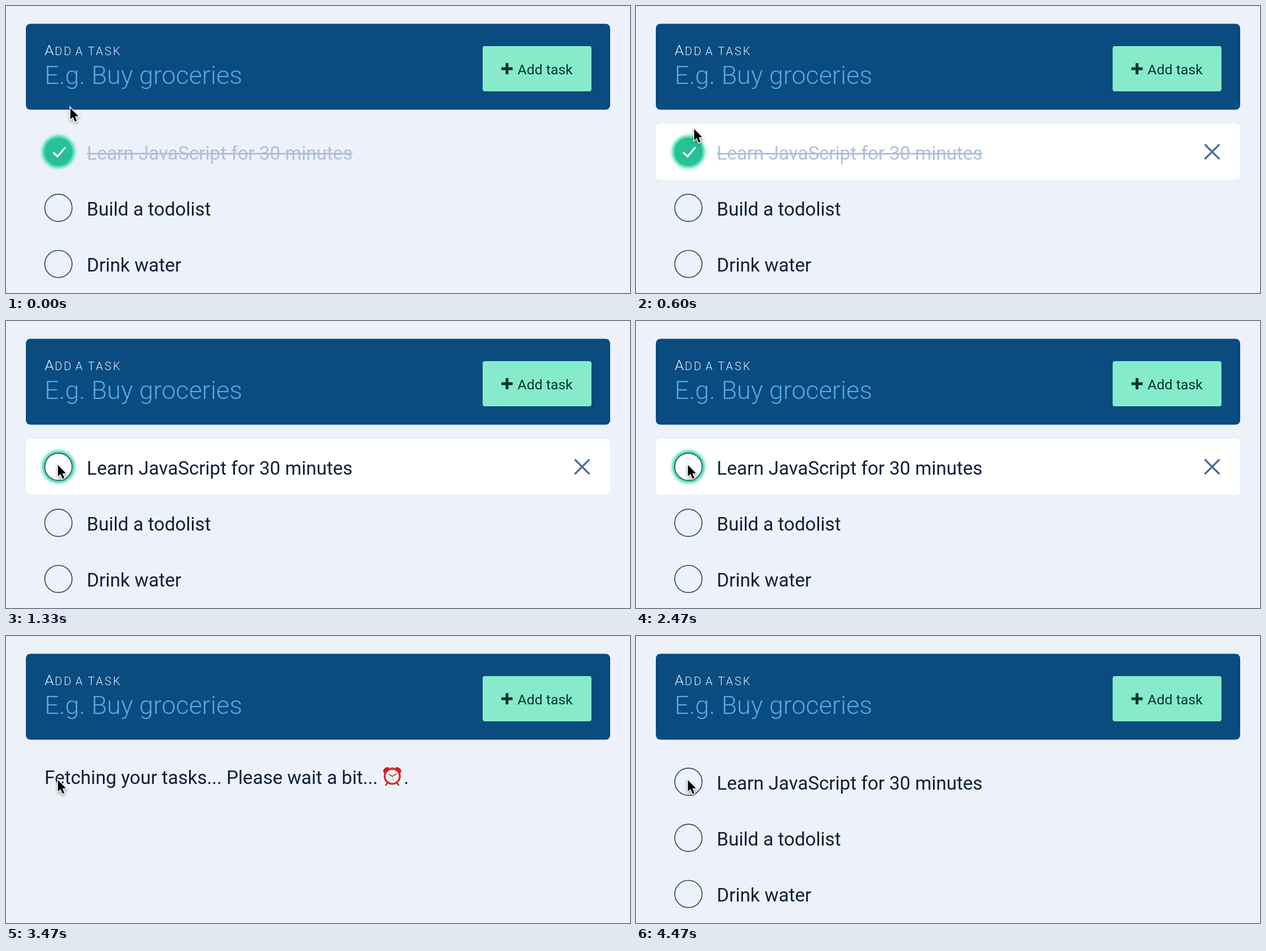
Recreate the animation shown at these times as an HTML page with a canvas. Size 1101 px wide and 508 px high, loop 4670 ms.

```html
<!DOCTYPE html>
<html lang="en">
<head>
<meta charset="utf-8">
<title>Todolist</title>
<style>
  html, body { margin: 0; width: 100%; height: 100%; overflow: hidden; background: #edf1f9; }
  canvas { display: block; width: 1101px; height: 508px; }
</style>
</head>
<body>
<canvas id="stage" width="1101" height="508"></canvas>
<script>
const ctx = document.getElementById('stage').getContext('2d');
const LOOP = 4670, TICK = 200 / 3;
const MOVE_START = 370, MOVE_END = 830, CLICK = 1000, RELOAD = 2665, LOADED = 3595;
const FROM = [112, 177.5], TO = [90, 252];
const TASKS = ['Learn JavaScript for 30 minutes', 'Build a todolist', 'Drink water'];
const ROW_TOP = 208.5, ROW_PITCH = 99.3;
const INK = '#0d2138', GREEN = '#26c196';

function text(str, x, y, size, color, weight = 400, spacing = 0) {
  ctx.font = `${weight} ${size}px Roboto, sans-serif`;
  ctx.letterSpacing = spacing + 'px';
  ctx.fillStyle = color;
  ctx.fillText(str, x, y);
}

function box(x, y, w, h, r, color) {
  ctx.fillStyle = color;
  ctx.beginPath();
  ctx.roundRect(x, y, w, h, r);
  ctx.fill();
}

function trace(points, closed) {
  ctx.beginPath();
  points.forEach(([x, y]) => ctx.lineTo(x, y));
  if (closed) ctx.closePath();
}

function line(points, color, width) {
  trace(points);
  ctx.strokeStyle = color;
  ctx.lineWidth = width;
  ctx.stroke();
}

function disc(x, y, r, fill) {
  ctx.beginPath();
  ctx.arc(x, y, r, 0, Math.PI * 2);
  ctx.fillStyle = fill;
  ctx.fill();
}

function ring(x, y, r, color, width) {
  ctx.beginPath();
  ctx.arc(x, y, r, 0, Math.PI * 2);
  ctx.strokeStyle = color;
  ctx.lineWidth = width;
  ctx.stroke();
}

function drawHeader() {
  box(35, 31.5, 1031, 152, 8, '#0a4b80');
  const label = '#dceefb';
  text('A', 68, 86.5, 26.5, label, 300);
  text('DD', 86, 86.5, 20, label, 300, 2.9);
  text('A', 122.5, 86.5, 20, label, 300);
  text('TASK', 144.5, 86.5, 20, label, 300, 2.9);
  text('E.g. Buy groceries', 68, 137.5, 44.8, '#57a6e6', 300);

  box(841, 71, 192, 80, 4, '#86ebca');
  const dark = '#06352f';
  box(874, 108.6, 20, 5, 1, dark);
  box(881.5, 101, 5, 20, 1, dark);
  text('Add task', 902.6, 121, 24.8, dark);
}

function drawGlow(x, y) {
  const glow = ctx.createRadialGradient(x, y, 24, x, y, 35);
  const fade = [[0, 1], [0.27, 0.85], [0.45, 0.5], [0.64, 0.2], [0.82, 0.05], [1, 0]];
  fade.forEach(([at, alpha]) => glow.addColorStop(at, `rgba(66, 220, 172, ${alpha})`));
  disc(x, y, 35, glow);
}

function drawTask(i, { checked, focused, hovered }) {
  const dy = i * ROW_PITCH, x = 92.5, y = 258 + dy;
  if (hovered) {
    box(35, ROW_TOP + dy, 1031, 99, 8, '#fff');
    const cx = 1016.5, arm = 13;
    line([[cx - arm, y - arm], [cx + arm, y + arm]], '#4d6c97', 3.2);
    line([[cx - arm, y + arm], [cx + arm, y - arm]], '#4d6c97', 3.2);
  }
  if (focused) drawGlow(x, y);
  if (checked) {
    disc(x, y, 24.8, GREEN);
    line([[x - 9.3, y + 1.2], [x - 1.6, y + 8.4], [x + 12.2, y - 8]], '#fff', 3.2);
  } else {
    if (hovered) disc(x, y, 24.8, '#fff');
    ring(x, y, 24.1, '#2f4d70', 1.7);
  }
  text(TASKS[i], 142.6, 271.5 + dy, 33.1, checked ? '#b0c0d7' : INK);
  if (checked) {
    const width = ctx.measureText(TASKS[i]).width;
    box(142.6, 260 + dy, width, 3, 0, '#b0c0d7');
  }
}

function drawClock(x, y) {
  for (const s of [-1, 1]) {
    line([[x + s * 8, y + 11], [x + s * 12, y + 16]], '#8f2026', 2.2);
    ctx.save();
    ctx.translate(x + s * 10.5, y - 11);
    ctx.rotate(s * 0.75);
    ctx.beginPath();
    ctx.ellipse(0, 0, 6.4, 4.3, 0, 0, Math.PI * 2);
    ctx.fillStyle = '#c91f2c';
    ctx.fill();
    ctx.restore();
  }
  line([[x - 4, y - 15.5], [x + 4, y - 15.5]], '#a8b0b8', 1.6);
  disc(x, y, 15, '#cf2431');
  disc(x, y, 11.8, '#f3efe9');
  for (let k = 0; k < 12; k++) {
    const a = k * Math.PI / 6;
    disc(x + Math.cos(a) * 10, y + Math.sin(a) * 10, 0.6, '#777');
  }
  line([[x - 6, y - 4], [x, y], [x + 7.5, y - 4.5]], '#35302e', 1.3);
  line([[x, y], [x + 2, y + 7]], '#cf6a55', 0.7);
}

function drawFetching() {
  text('Fetching your tasks... Please wait a bit...', 68, 261.5, 33.1, INK);
  drawClock(681.5, 248.5);
  text('.', 702, 261.5, 33.1, INK);
}

function drawCursor([x, y]) {
  ctx.save();
  ctx.translate(x, y);
  trace([[1.6, 3], [1.6, 23], [6.2, 18.9], [9.8, 27.2], [13, 25.8],
    [9.5, 17.7], [15.8, 17.4]], true);
  ctx.lineJoin = 'miter';
  ctx.shadowColor = 'rgba(0, 0, 0, 0.4)';
  ctx.shadowBlur = 4;
  ctx.shadowOffsetY = 2;
  ctx.strokeStyle = '#fff';
  ctx.lineWidth = 3;
  ctx.stroke();
  ctx.shadowColor = 'transparent';
  ctx.fillStyle = '#000';
  ctx.fill();
  ctx.restore();
}

function cursorAt(t) {
  const p = Math.min(1, Math.max(0, (t - MOVE_START) / (MOVE_END - MOVE_START)));
  const eased = (1 - Math.cos(Math.PI * p)) / 2;
  return FROM.map((v, i) => v + (TO[i] - v) * eased);
}

function draw(t) {
  ctx.fillStyle = '#edf1f9';
  ctx.fillRect(0, 0, 1101, 508);
  drawHeader();
  const cursor = cursorAt(t);
  if (t >= RELOAD && t < LOADED) {
    drawFetching();
  } else {
    const live = t < RELOAD;
    drawTask(0, {
      checked: t < CLICK - 5,
      focused: live,
      hovered: live && cursor[1] > ROW_TOP
    });
    drawTask(1, {});
    drawTask(2, {});
  }
  drawCursor(cursor);
}

// The picture advances fifteen times a second.
const start = performance.now();
function tick(now) {
  const t = Math.max(0, now - start) % LOOP;
  draw(Math.floor((t + 4) / TICK) * TICK);
  requestAnimationFrame(tick);
}
draw(0);
requestAnimationFrame(tick);
</script>
</body>
</html>
```
